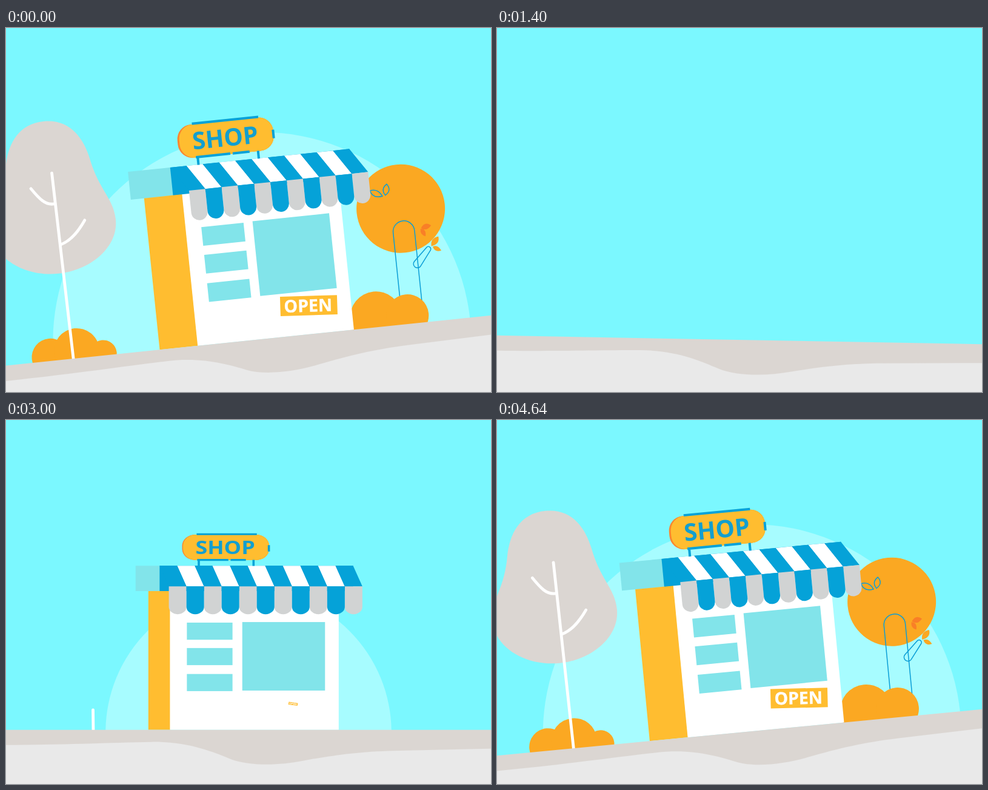
These frames come from a looping animation (800 px wide and 600 px high, 4680 ms). An HTML page:

```html
<!DOCTYPE html>
<html lang="en">
<head>
<meta charset="utf-8">
<title>Little shop</title>
<style>
html, body { margin: 0; width: 100%; height: 100%; overflow: hidden; background: #7bf8ff; }
svg { display: block; width: 100vw; height: 100vh; }
text { font-family: "Open Sans", "Noto Sans", sans-serif; font-weight: 700; text-anchor: middle; }
.leaf { fill: #fba822; }
.line { fill: none; stroke: #0a9dd6; stroke-width: 1.5; }
.twig { fill: none; stroke: #fff; stroke-width: 4.8; stroke-linecap: round; }
.teal { fill: #82e4ea; }
.blue { fill: #05a2d8; }
.sun { fill: #ffbd30; }
</style>
</head>
<body>
<svg viewBox="0 0 800 600" preserveAspectRatio="none">
  <rect width="800" height="600" fill="#7bf8ff"/>
  <g id="scene">
    <g id="moon"><circle cx="400" cy="518" r="345" fill="#a7fcff"/></g>
    <g id="treeR">
      <circle class="leaf" cx="650" cy="323.6" r="73"/>
      <path class="line" d="M633.5 513V361.7a17.7 17.7 0 0 1 35.4 0V513Z"/>
      <path class="line" d="M685.5 391.8A4 4 0 0 1 691.5 397.2L672.8 421.4A6.5 6.5 0 0 1 663.2 412.6Z"/>
      <path class="line" d="M602.5 289Q616 286 622 300Q606 303 602.5 289ZM627 299Q620 288 631 281Q639 292 627 299Z"/>
      <path fill="#f97f27" d="M680 359Q687 348 697 356Q689 366 680 359ZM679 360Q689 361 686 373Q677 370 679 360Z"/>
      <path class="leaf" d="M694 390.5Q693 377 707 375.5Q709 388 694 390.5ZM696 391.5Q704 388 709.5 399Q699 402 696 391.5Z"/>
    </g>
    <g id="bushR" class="leaf"><circle cx="591" cy="498" r="43"/><circle cx="643" cy="500" r="35"/></g>
    <g id="shop">
      <rect id="side" class="sun" y="-254" height="254"/>
      <g id="front">
        <rect y="-258" width="259" height="258" fill="#fff"/>
        <g id="panes" class="teal"></g>
        <g id="fence" fill="none" stroke="#ffbd30" stroke-width="6"></g>
        <g id="open">
          <rect class="sun" x="-47" y="-16" width="94" height="32"/>
          <text x="-1.2" y="10" font-size="28.4" fill="#fff" stroke="#fff" stroke-width=".4">OPEN</text>
        </g>
      </g>
      <g id="roof">
        <path id="cap" class="teal"/>
        <path id="box" class="blue"/>
        <path id="white" fill="#fff"/>
        <path id="azure" class="blue"/>
        <path id="flapG" fill="#d1d3d3"/>
        <path id="flapB" class="blue"/>
      </g>
      <g id="trim">
        <path id="foam" fill="none" stroke="#fff" stroke-width="6.5"/>
        <path id="lace" fill="none" stroke="#ffbd30" stroke-width="8"/>
      </g>
      <g id="sign">
        <rect x="-79.5" y="-27.5" width="159" height="55" rx="24" fill="#f98730"/>
        <rect id="pill" class="sun" y="-27.5" height="55" rx="24"/>
        <path fill="none" stroke="#05a2d8" stroke-width="4" d="M-53 -28.5H57M-52 27H5M9 27H37M-49 27V40M51 27V40M79 -5V9"/>
        <text x="-.8" y="14.2" font-size="39.7" fill="#139fcf">SHOP</text>
      </g>
    </g>
    <g id="bushL" class="leaf"><circle cx="87" cy="508" r="31"/><circle cx="131" cy="502" r="37.5"/><circle cx="174" cy="511" r="22.5"/></g>
    <g id="treeL">
      <path id="crown" fill="#dbd6d2" d="M135 120C178 120 198 153 205 190C215 243 237 258 237 293C237 338 188 372 134 372C80 372 31 338 31 293C31 258 55 243 65 190C72 153 92 120 135 120Z"/>
      <path id="trunk" class="twig" d="M140 206L144 516"/>
      <g id="twigs">
        <path class="twig" pathLength="1" d="M138.5 257C124 258 115 246 103 228"/>
        <path class="twig" pathLength="1" d="M142 325C162 320 176 303 186 289"/>
      </g>
    </g>
    <path fill="#dbd6d2" d="M-300 514H1100V900H-300Z"/>
    <path fill="#e9e9e9" d="M-300 542L0 539C80 539 180 535 240 534C300 533 340 550 370 562C400 574 450 573 490 565C540 556 580 550 640 548.5L800 545L1100 540V900H-300Z"/>
  </g>
</svg>
<script>
const LOOP = 4680, GROUND = 514;
const el = {};
document.querySelectorAll('[id]').forEach(n => el[n.id] = n);
const set = (id, name, v) => el[id].setAttribute(name, v);
const move = (id, v) => set(id, 'transform', v);
const clamp = x => Math.min(1, Math.max(0, x));
const mix = (a, b, p) => a + (b - a) * p;

// value of a table of [time, value] steps, eased by a half cosine
function key(t, steps) {
  if (t <= steps[0][0]) return steps[0][1];
  for (let i = 1; i < steps.length; i++) {
    const [a, va] = steps[i - 1], [b, vb] = steps[i];
    if (t < b) return mix(va, vb, (1 - Math.cos(Math.PI * (t - a) / (b - a))) / 2);
  }
  return steps[steps.length - 1][1];
}
const out = (t, a, b) => 1 - (1 - clamp((t - a) / (b - a))) ** 3;
// slide to the left, speeding up from time a
const leave = (t, a) => -1.284e-6 * Math.max(0, t - a) ** 3;
const grow = (id, dx, x, y, sx, sy = sx) =>
  move(id, `translate(${x + dx} ${y}) scale(${sx} ${sy}) translate(${-x} ${-y})`);

// window panes: [x, y, w, h] with the fence, then without
const panes = [-194, -148, -101].map(y => [[47, y - 31, 70, 31], [26, y, 70, 31]]);
panes.push([[133, -224, 90, 123], [111, -195, 127, 124]]);
const svgNode = name => document.createElementNS('http://www.w3.org/2000/svg', name);
const paneNodes = panes.map(() => el.panes.appendChild(svgNode('rect')));

let rails = 'M-3 -68H265';
for (let i = 0; i < 11; i++) rails += `M${25 + 23.3 * i} -68V0`;
el.fence.appendChild(svgNode('path')).setAttribute('d', rails);
const hanging = el.trim.appendChild(svgNode('rect'));
hanging.setAttribute('class', 'teal');
hanging.setAttribute('y', -209);
hanging.setAttribute('width', 55);
hanging.setAttribute('height', 54);

// eleven waves of width w, from crest to crest
function wave(x, y, w) {
  let d = `M${x} ${y}`;
  for (let i = 0; i < 22; i++) {
    const h = i % 2 ? -10 : 10;
    d += `c${w / 4} 0 ${w / 4} ${h} ${w / 2} ${h}`;
  }
  return d;
}

function drawRoof(t, left, u, kx) {
  const a = key(t, [[2660, 0], [2940, 1]]);
  const x0 = left - 19.8 + 4.8 * u, p = 27 * kx, d = 27 * u * a;
  const fade = key(t, [[2600, 1], [2800, 0]]);
  set('cap', 'd', `M${x0 - 70 * u} -297H${x0 + 1}V-251H${x0 - 70 * u}Z` +
    (fade > 0 ? `M${x0} -297v${-12 * fade}h${11 * p}v${12 * fade}Z` : ''));
  set('box', 'd', `M${x0} -297h${11 * p}V-251H${x0}Z`);
  const stripes = ['', ''], flaps = ['', ''];
  const drop = 32.7 + 8.3 * u, r = 13.5 * a;
  for (let i = 0; i < 11 && a > 0; i++) {
    const x = x0 + p * i, odd = i % 2, h = odd ? drop * a : drop;
    stripes[odd] += `M${x} -297h${p}l${d * h / drop} ${h}h${-p}Z`;
    flaps[odd] += `M${x + d} ${drop - 297}v${37 * a}a${p / 2} ${r} 0 0 0 ${p} 0v${-37 * a}Z`;
  }
  set('azure', 'd', stripes[0]);
  set('white', 'd', stripes[1]);
  set('flapG', 'd', flaps[0]);
  set('flapB', 'd', flaps[1]);
  set('trim', 'opacity', fade);
  set('foam', 'd', wave(x0 - 1, -318, 28.4 * kx));
  set('lace', 'd', wave(x0 + 2, -265, 28.4 * kx));
  hanging.setAttribute('x', left + 262 * kx);
}

function drawShop(t) {
  const phi = key(t, [[2760, 24], [3260, 3], [3360, 3.9], [4000, 25.5]]) * Math.PI / 180;
  const s = key(t, [[1900, 0], [2150, .465], [2300, .456], [2600, .456], [2880, 1]]);
  const sy = key(t, [[2800, 1], [2920, .82], [3180, 1.23], [3360, 1.146], [3560, 1.128], [3980, 1]]);
  const turn = key(t, [[2600, -6.8], [2830, 0]]);
  const x = key(t, [[2600, 382], [2830, 391.8]]) + leave(t, 4633);
  const y = Math.min(GROUND, 235 + 8.83e-4 * Math.max(0, t - 2275) ** 2);
  move('shop', `translate(${x} ${y}) rotate(${turn}) scale(${s} ${s * sy})`);

  const u = Math.sin(phi) / .4305, w = 287 * Math.cos(phi), kx = w / 259;
  const depth = 63 * u, left = (depth - w) / 2;
  set('side', 'x', left - depth);
  set('side', 'width', depth + .5);
  move('front', `translate(${left} 0) scale(${kx} 1)`);

  const plain = key(t, [[2600, 0], [2840, 1]]);
  panes.forEach(([from, to], i) => ['x', 'y', 'width', 'height'].forEach((name, j) =>
    paneNodes[i].setAttribute(name, mix(from[j], to[j], plain))));
  move('fence', `scale(1 ${1 - plain})`);
  set('fence', 'opacity', plain < 1 ? 1 : 0);

  const tilt = key(t, [[3000, 10], [3360, 7.2], [4040, 5], [4680, 4.1]]);
  const tag = key(t, [[2960, 0], [3130, 1.1], [3220, 1]]);
  move('open', `translate(189 -47) rotate(${tilt}) scale(${tag})`);

  drawRoof(t, left, u, kx);
  const pop = key(t, [[2860, 0], [3060, 1.05], [3160, 1]]);
  move('sign', `translate(${left + 81 * kx + 11 * (1 - u)} ${-297 - 39.5 * pop}) scale(${kx * pop} ${pop})`);
  const lip = 3 * clamp(u);
  set('pill', 'x', -79.5 + lip);
  set('pill', 'width', 159 - lip);
}

function draw(ms) {
  // one cycle runs from the empty street to the next empty street
  const t = ms < 1800 ? ms + LOOP : ms;
  const tilt = key(t, [[3900, 0], [5300, 10], [5840, -1.7], [6400, 0]]);
  const hit = t - 2830;
  const shake = hit > 0 && hit < 530 ? 10 * Math.exp(-hit / 200) * Math.sin(hit * 4 * Math.PI / 530) : 0;
  move('scene', `translate(0 ${shake}) rotate(${-tilt} 400 300)`);

  grow('moon', leave(t, 5070), 400, 518, out(t, 2880, 3260));
  grow('treeR', leave(t, 4992), 651, GROUND,
    key(t, [[3440, 0], [3800, 1]]),
    key(t, [[3440, 0], [3800, 1.06], [4040, .953], [4220, 1]]));
  grow('bushR', leave(t, 4907), 612.5, GROUND,
    key(t, [[3180, 0], [3460, 1.05], [3640, 1]]),
    key(t, [[3180, 0], [3440, 1.1], [3640, 1]]));
  grow('bushL', leave(t, 4375), 125, GROUND + 1, key(t, [[3290, 0], [3680, 1]]));

  move('treeL', `translate(${leave(t, 4328)} 0)`);
  grow('crown', 0, 143, 371, key(t, [[3170, 0], [3500, 1.01], [3680, 1]]));
  const rise = out(t, 2980, 3520);
  set('trunk', 'd', `M${144 - 4 * rise} ${516 - 310 * rise}L144 516`);
  set('trunk', 'opacity', rise > 0 ? 1 : 0);
  const reach = key(t, [[3480, 0], [3840, 1]]);
  set('twigs', 'stroke-dasharray', `${reach} 2`);
  set('twigs', 'opacity', reach > 0 ? 1 : 0);

  drawShop(t);
}

const start = performance.now();
function tick() {
  draw((performance.now() - start) % LOOP);
  requestAnimationFrame(tick);
}
tick();
</script>
</body>
</html>
```
